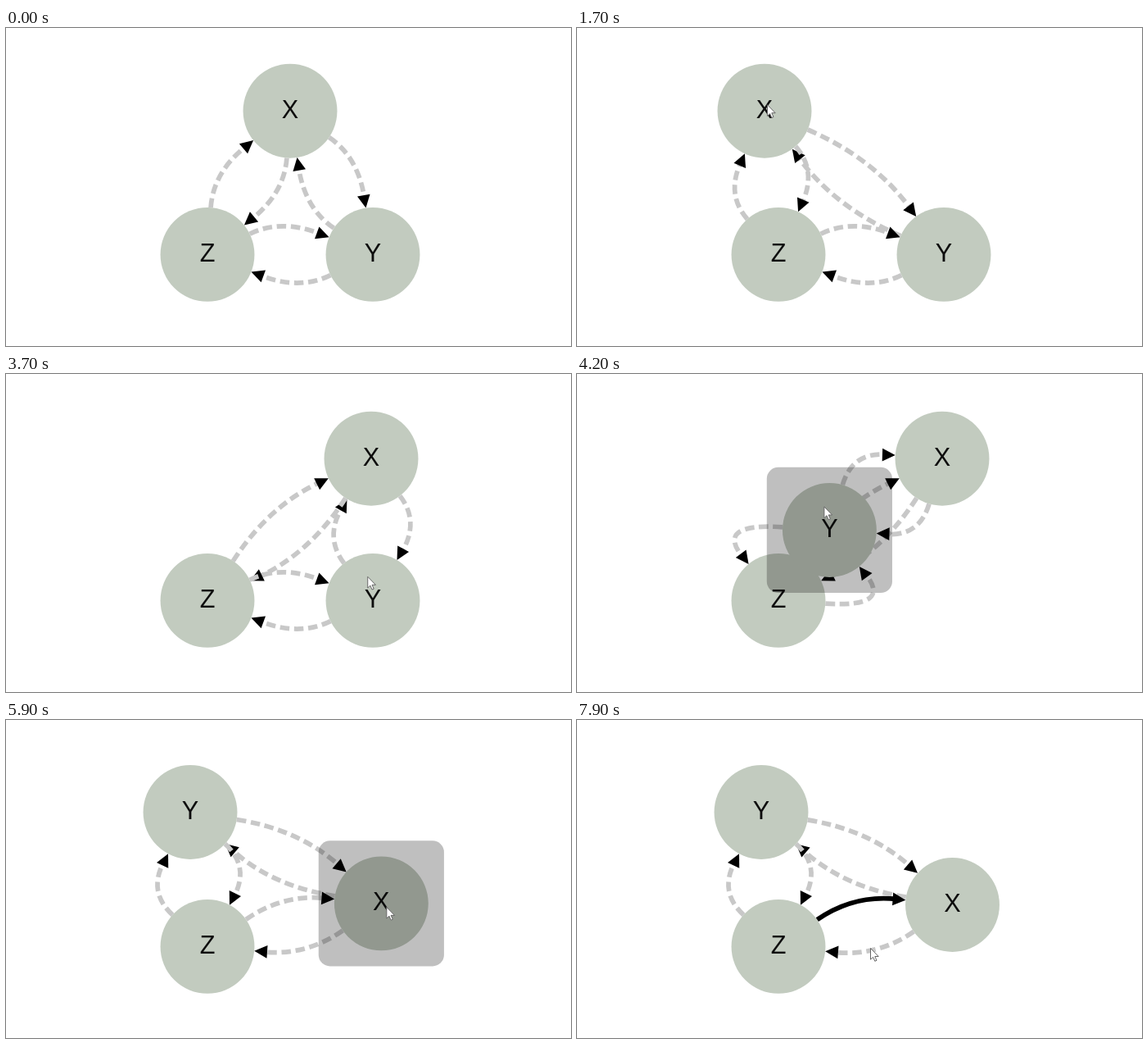
These frames come from a looping animation (690 px wide and 388 px high, 8000 ms). An HTML page with a canvas:

```html
<!DOCTYPE html>
<html lang="en">
<head>
<meta charset="utf-8">
<title>Graph dragging</title>
<style>
  html, body { margin: 0; width: 100%; height: 100%; overflow: hidden; background: #fff; }
  canvas { display: block; width: 690px; height: 388px; }
</style>
</head>
<body>
<canvas id="stage" width="690" height="388"></canvas>
<script>
const ctx = document.getElementById('stage').getContext('2d');
const LOOP = 8000, STEP = 100;
const ZOOM = 1.915, R = 30 * ZOOM;
const BEND = 20 * ZOOM, PAD = 10 * ZOOM, LINE = 3 * ZOOM;
const ARROW = 27.5 * ZOOM, HEAD = 0.3 * ARROW, TIP_GAP = 2 * LINE;
const SHADE = 'rgba(0,0,0,.25)';

const point = (x, y) => ({ x, y });
const linear = u => u;
const easeOut = u => 1 - (1 - u) ** 2;
const glide = u => 1 - (1 - u) ** 2.5;
const swing = u => (1 - Math.cos(1.28 * Math.PI * u)) / (1 - Math.cos(1.28 * Math.PI));

// Everything the pointer visits
const homes = { X: point(347, 101.2), Y: point(448, 276.4), Z: point(246, 276.4),
                ZX: point(334, 229), rest: point(358, 278) };
const edges = ['YX', 'XZ', 'XY', 'ZX', 'YZ', 'ZY'];
const entry = point(244, 247), ENTER = 100;

const nodeGrip = point(3, -8);
const gestures = [
  { item: 'X', from: 700, to: 1500, release: 1700, end: point(229, 101.2), grip: nodeGrip },
  { item: 'X', from: 1900, to: 2930, release: 3300, end: point(446, 103.2), grip: nodeGrip, bow: 7 },
  { item: 'Y', from: 3750, to: 5000, release: 5000, end: point(225, 112.5), grip: point(-7, -29), bow: 14, ease: easeOut },
  { item: 'X', from: 5400, to: 6300, release: 6400, end: point(458.5, 225.5), grip: point(6, 4), ease: swing },
  { item: 'ZX', from: 7000, release: 7300 },
  { item: 'rest', from: 7900, release: LOOP }
];
const clickEnd = gestures.find(g => g.item === 'ZX').release;

const progress = (t, from, to) => Math.min(1, Math.max(0, (t - from) / (to - from)));

// Travel from a to b, bowed to the left of the way
function travel(a, b, v, bow = 0) {
  const dx = b.x - a.x, dy = b.y - a.y;
  const side = bow * Math.sin(Math.PI * Math.min(v, 1)) / (Math.hypot(dx, dy) || 1);
  return point(a.x + dx * v + dy * side, a.y + dy * v - dx * side);
}

function scene(t) {
  const spots = { ...homes };
  let pointer = entry, left = ENTER, held = null;
  for (const { item, from, to, release, end, grip = point(0, 0), bow, ease = linear } of gestures) {
    const target = point(spots[item].x + grip.x, spots[item].y + grip.y);
    if (t < from) {
      pointer = travel(pointer, target, glide(progress(t, left, from)), 16);
      break;
    }
    if (end) spots[item] = travel(spots[item], end, ease(progress(t, from, to)), bow);
    pointer = point(spots[item].x + grip.x, spots[item].y + grip.y);
    left = release;
    if (t < release) {
      if (t > from) held = item;
      break;
    }
  }
  return { spots, pointer, held };
}

// The point at distance d from a, towards b
function toward(a, b, d) {
  const len = Math.hypot(b.x - a.x, b.y - a.y) || 1;
  return point(a.x + (b.x - a.x) / len * d, a.y + (b.y - a.y) / len * d);
}

const distance = (a, b) => Math.hypot(b.x - a.x, b.y - a.y);

// Keep the control point one arrow size away from both ends of the line
function controlPoint(a, b) {
  const bend = distance(a, b) < 2 * R ? -BEND : BEND;
  let c = travel(a, b, 0.5, bend);
  const room = distance(a, c) - R;
  for (const [node, gap] of [[a, 0], [b, TIP_GAP]]) {
    const push = Math.max(0, ARROW + gap - room);
    c = toward(node, c, distance(node, c) + push);
  }
  return c;
}

function drawEdge(a, b, selected, pressed) {
  const c = controlPoint(a, b);
  const from = toward(a, c, R), tip = toward(b, c, R), end = toward(tip, c, TIP_GAP);

  ctx.beginPath();
  ctx.moveTo(from.x, from.y);
  ctx.quadraticCurveTo(c.x, c.y, end.x, end.y);
  ctx.lineWidth = LINE;
  ctx.strokeStyle = selected ? '#000' : '#c8c8c8';
  ctx.setLineDash(selected ? [] : [6 * ZOOM, 3 * ZOOM]);
  ctx.stroke();
  ctx.setLineDash([]);
  if (pressed) {
    ctx.lineWidth = LINE + 2 * PAD;
    ctx.strokeStyle = SHADE;
    ctx.stroke();
  }

  const near = k => 0.01 * from[k] + 0.18 * c[k] + 0.81 * tip[k];
  ctx.save();
  ctx.translate(tip.x, tip.y);
  ctx.rotate(Math.atan2(tip.y - near('y'), tip.x - near('x')));
  ctx.beginPath();
  ctx.moveTo(0, 0);
  ctx.lineTo(-HEAD, -HEAD / 2);
  ctx.lineTo(-HEAD, HEAD / 2);
  ctx.fillStyle = '#000';
  ctx.fill();
  ctx.restore();
}

function drawNode(name, p, pressed) {
  ctx.beginPath();
  ctx.arc(p.x, p.y, R, 0, 2 * Math.PI);
  ctx.fillStyle = '#c2cbbf';
  ctx.fill();
  ctx.fillStyle = '#0c0c0c';
  ctx.fillText(name, p.x, p.y + 8.6);
  if (pressed) {
    const half = R + PAD;
    ctx.beginPath();
    ctx.roundRect(p.x - half, p.y - half, 2 * half, 2 * half, 14);
    ctx.fillStyle = SHADE;
    ctx.fill();
  }
}

const cursorShape = new Path2D('M.5 .5V14.2L3.6 11.3L5.8 16.3L8 15.3L5.8 10.5H10.2Z');

function drawCursor(p) {
  ctx.save();
  ctx.translate(p.x, p.y);
  ctx.fillStyle = '#fff';
  ctx.fill(cursorShape);
  ctx.lineWidth = 1;
  ctx.strokeStyle = '#666';
  ctx.stroke(cursorShape);
  ctx.restore();
}

function draw(t) {
  const { spots, pointer, held } = scene(t);
  ctx.fillStyle = '#fff';
  ctx.fillRect(0, 0, 690, 388);
  ctx.font = 16 * ZOOM + 'px "Liberation Sans", Arial, sans-serif';
  ctx.textAlign = 'center';
  for (const e of edges) {
    drawEdge(spots[e[0]], spots[e[1]], e === 'ZX' && t >= clickEnd, e === held);
  }
  const order = ['X', 'Z', 'Y'].sort((a, b) => (a === held) - (b === held));
  for (const name of order) drawNode(name, spots[name], name === held);
  if (t >= ENTER) drawCursor(pointer);
}

const start = performance.now();
function tick() {
  const t = (performance.now() - start) % LOOP;
  draw(Math.floor(t / STEP) * STEP);
  requestAnimationFrame(tick);
}
tick();
</script>
</body>
</html>
```
